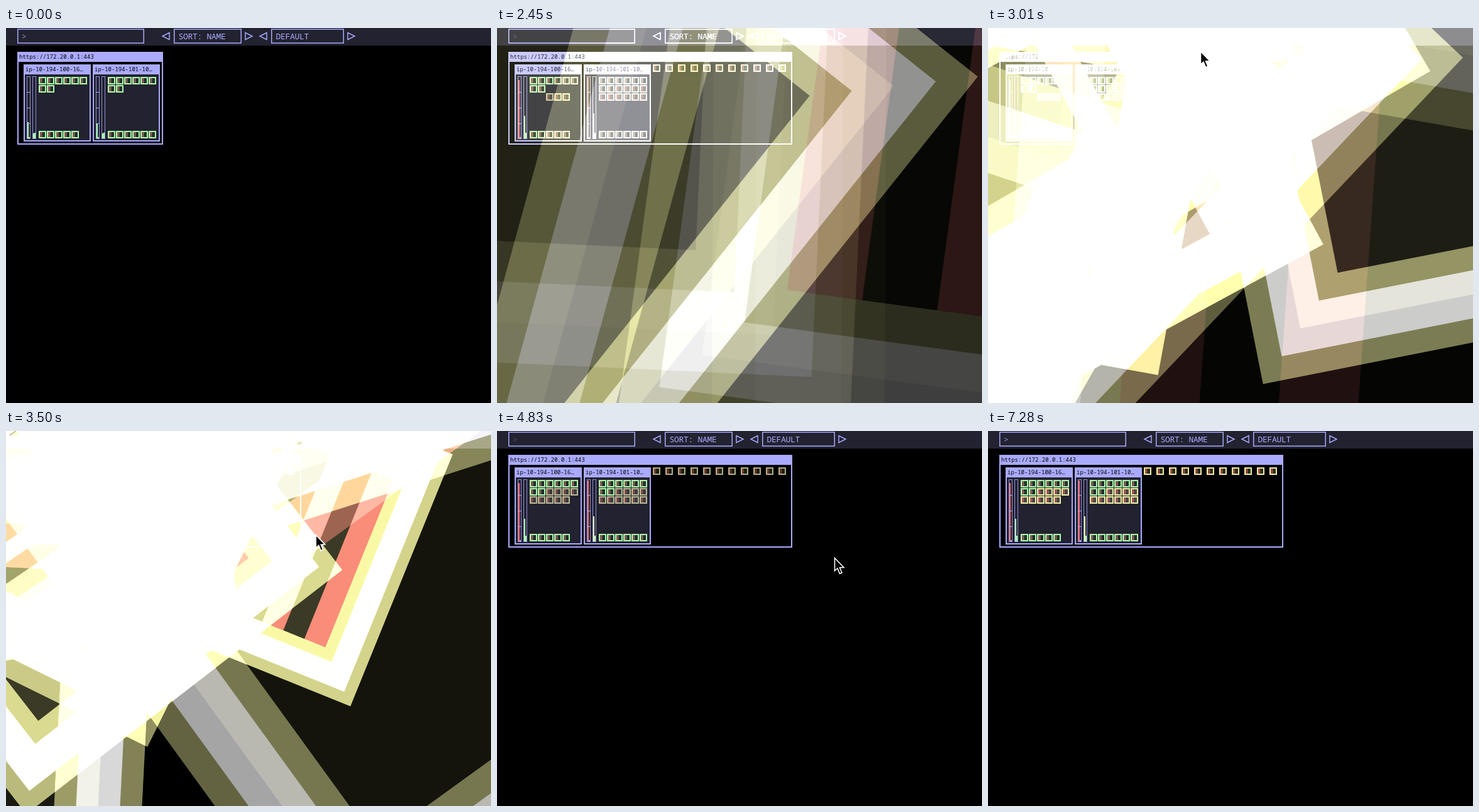
An HTML page with a canvas for the animation above (7350 ms loop, 772 by 598 pixels).

```html
<!DOCTYPE html>
<html>
<head>
<meta charset="utf-8">
<style>
  html, body { margin: 0; width: 100%; height: 100%; overflow: hidden; background: #000; }
  canvas { display: block; }
</style>
</head>
<body>
<canvas id="stage" width="772" height="598"></canvas>
<script>
const ctx = document.getElementById('stage').getContext('2d');
const LOOP = 7350, STEP = 70, SCALE_UP = 1820, ALL_PLACED = 4570;
const FIRST_FLIGHT = 1880, BEAT = 105, FLIGHT_TIME = 1742, LANDING_Y = 97;
const LILAC = '#aaaaff', PANEL = '#222230', GREEN = '#aaffaa', YELLOW = '#ffffaa', RED = '#ff6f6f';

// One pod is launched per beat: beat, landing x, starting offset x and y
const flights = [
  [0, 144, -247, 305],
  [2, 79, -444, 89],
  [3, 118, 1159, 51],
  [4, 53, -115, -161],
  [5, 66, -138, 157],
  [6, 92, -270, -137],
  [7, 105, -757, 785],
  [8, 105, 664, -661],
  [9, 189, 748, 320]
];

// Pointer path: time, x, y
const pointer = [
  [2730, 338, -30], [3010, 338, 37], [3640, 537, 202],
  [4900, 537, 202], [5390, 524, 396], [6500, 445, 602]
];

function rect(color, x, y, w, h) {
  ctx.fillStyle = color;
  ctx.fillRect(x, y, w, h);
}

function frame(color, width, x, y, w, h) {
  ctx.strokeStyle = color;
  ctx.lineWidth = width;
  ctx.strokeRect(x, y, w, h);
}

function label(text, x, y, size, color) {
  ctx.font = size + 'px "Noto Sans Mono", "DejaVu Sans Mono", monospace';
  ctx.letterSpacing = size > 10 ? '-0.3px' : '0px';
  ctx.fillStyle = color;
  ctx.fillText(text, x, y);
}

function polygon(points, fill, stroke, width) {
  ctx.beginPath();
  points.forEach(([x, y]) => ctx.lineTo(x, y));
  ctx.closePath();
  ctx.lineWidth = width;
  ctx.strokeStyle = stroke;
  if (fill) { ctx.fillStyle = fill; ctx.fill(); }
  ctx.stroke();
}

function arrow(x, dir) {
  polygon([[x, 13], [x + 11 * dir, 7.5], [x + 11 * dir, 18.5]], null, LILAC, 1.4);
}

function pulse(clock, period) {
  return Math.sin((clock % period) / period * Math.PI);
}

function podBody(color, alpha, barAlpha) {
  ctx.globalAlpha = alpha * 0.2;
  rect(color, 0, 0, 10, 10);
  ctx.globalAlpha = alpha * barAlpha;
  rect(RED, 1, 1, 1, 8);
  rect(RED, 3, 1, 1, 8);
  ctx.globalAlpha = alpha;
  frame(LILAC, 1, 0, 0, 10, 10);
  frame(color, 2, 0, 0, 10, 10);
}

function pod(x, y, color, alpha = 1) {
  ctx.save();
  ctx.translate(x, y);
  podBody(color, alpha, color === GREEN ? 0.65 : 1);
  if (color === GREEN) {
    ctx.globalAlpha = 0.4;
    rect('#000', 5, 1, 4, 8);
  }
  ctx.restore();
}

function podRow(x, y, from, to, color, alpha) {
  for (let i = from; i < to; i++) pod(x + 13 * i, y, color, alpha);
}

function meter(x, top, color, used) {
  frame('#9090d8', 1, x + 0.5, 77.5, 5, 99);
  rect(color, x + 1, top, 2, 176 - top);
  rect(color === RED ? LILAC : GREEN, x + 3, used, 2, 176 - used);
}

function node(x, name, cpu, cpuColor, mem, memColor) {
  rect(PANEL, x, 58, 107, 123);
  rect(LILAC, x, 58, 107, 16);
  frame(LILAC, 2, x + 1, 59, 105, 121);
  label(name, x + 3, 69, 9, '#000');
  meter(x + 5, cpu, cpuColor, 174);
  for (let y = 102; y < 160; y += 25) rect(LILAC, x + 5, y, 6, 1);
  meter(x + 14, mem, memColor, 167);
}

function header(clock) {
  rect(PANEL, 0, 0, 772, 28);
  frame(LILAC, 1.5, 18.75, 2, 200.5, 22);
  frame(LILAC, 1.5, 267.75, 2, 106.5, 22);
  frame(LILAC, 1.5, 422.75, 2, 114.5, 22);
  arrow(249, 1);
  arrow(392, -1);
  arrow(404, 1);
  arrow(555, -1);
  label('SORT: NAME', 274.5, 18, 13, LILAC);
  label('DEFAULT', 429.5, 18, 13, LILAC);
  ctx.globalAlpha = pulse(clock, 2000);
  label('>', 25, 18, 13, LILAC);
  ctx.globalAlpha = 1;
}

function cluster(t, clock) {
  const full = t >= SCALE_UP, width = full ? 452 : 232;
  const glow = pulse(clock, 1000);
  const cpuColor = full ? RED : GREEN;
  rect(LILAC, 18, 38, width, 16);
  frame(LILAC, 2, 19, 39, width - 2, 146);
  label('https://172.20.0.1:443', 21, 49, 9, '#000');
  node(28, 'ip-10-194-100-16…', full ? 83 : 150, cpuColor, full ? 140 : 168, GREEN);
  node(138, 'ip-10-194-101-10…', full ? 79 : 152, cpuColor, full ? 136 : 168, full ? '#e4ffaa' : GREEN);
  [53, 163].forEach((x, i) => {
    podRow(x, 79, 0, 6, GREEN);
    podRow(x, 92, 0, 2, GREEN);
    podRow(x, 165, 0, 5 + i, GREEN);
  });
  if (!full) return;
  const placed = t >= ALL_PLACED;
  if (placed) podRow(53, 92, 2, 6, YELLOW, glow);
  podRow(53, 105, placed ? 0 : 2, 5, YELLOW, glow);
  podRow(163, 92, 2, 6, YELLOW, glow);
  podRow(163, 105, 0, 6, YELLOW, glow);
  for (let i = 0; i < 11; i++) pod(249 + 20 * i, 59, YELLOW, glow);
}

// A new pod shrinks, turns once and brightens on its way to the node
function fly(t, [beat, x, dx, dy]) {
  const p = (t - FIRST_FLIGHT - beat * BEAT) / FLIGHT_TIME;
  if (p <= 0 || p >= 1) return;
  const rest = 1 - p, size = 1 + 140 * rest;
  ctx.save();
  ctx.globalCompositeOperation = 'lighter';
  ctx.translate(x + dx * rest, LANDING_Y + dy * rest);
  ctx.rotate(p * p * Math.PI * 2);
  ctx.scale(size, size);
  ctx.translate(-6, -6);
  podBody(YELLOW, p, 1);
  ctx.restore();
}

function drawPointer(t) {
  const i = pointer.findIndex(k => k[0] > t);
  if (i < 1) return;
  const [t0, x0, y0] = pointer[i - 1], [t1, x1, y1] = pointer[i];
  const f = (t - t0) / (t1 - t0);
  ctx.save();
  ctx.translate(x0 + (x1 - x0) * f, y0 + (y1 - y0) * f);
  polygon([[0.5, 0.5], [0.5, 21], [5, 17], [8.5, 25.5], [12, 24], [8.5, 16], [15, 15.5]], '#000', '#fff', 1.6);
  ctx.restore();
}

function draw(now) {
  const t = Math.floor((now % LOOP) / STEP) * STEP;
  const clock = t + 5370;
  rect('#000', 0, 0, 772, 598);
  header(clock);
  cluster(t, clock);
  flights.forEach(f => fly(t, f));
  drawPointer(t);
}

const began = performance.now();
function tick() {
  draw(performance.now() - began);
  requestAnimationFrame(tick);
}
tick();
</script>
</body>
</html>
```
